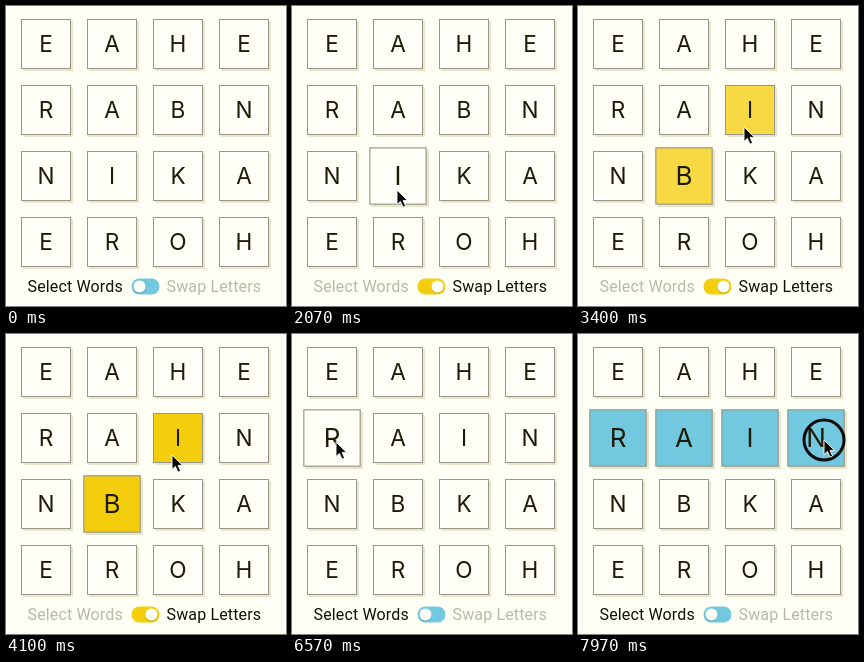
These frames come from a looping animation (280x300 px, 8000 ms). An HTML page:

```html
<!DOCTYPE html>
<html lang="en">
<head>
<meta charset="utf-8">
<title>Letter grid</title>
<style>
  html, body { margin: 0; width: 100%; height: 100%; overflow: hidden; background: #fffff6; }
  svg { display: block; width: 280px; height: 300px; cursor: default; }
  .letter { font: 400 22.6px Inter, "Open Sans", sans-serif; text-anchor: middle; fill: #1c1b08; }
  .label { font: 400 16px Roboto, Arial, sans-serif; letter-spacing: .15px; }
  .drag { filter: drop-shadow(0 0 7px rgba(165, 165, 40, .75)); }
</style>
</head>
<body>
<svg id="stage" viewBox="0 0 280 300" xmlns="http://www.w3.org/2000/svg"></svg>
<script>
const LOOP = 8000;
const INK = '#111108', MUTED = '#b8baa4';
const PAPER = [255, 255, 248], GOLD = [244, 206, 12], TEAL = [114, 200, 222];
const BEFORE = 'EAHERABNNIKAEROH', AFTER = 'EAHERAINNBKAEROH';
const FROM = 9, TO = 6;

// Moments of the story, in ms
const ON = 850, LIFT = 2312, DROP = 3300, CLEAR = 4280, OFF = 5285, PICK = 6720;
const PRESSES = [[740, ON], [2240, DROP], [5170, OFF], [PICK, LOOP]];

// Pointer stops: time, x, y, linear
const PATH = [
  [0, 168, 330], [150, 168, 330], [690, 136, 277], [1350, 136, 277],
  [2080, 105, 184], [LIFT, 105, 184], [LIFT + 700, 166, 121], [4180, 166, 121],
  [4950, 139, 281], [5560, 139, 281], [6350, 44, 108], [6760, 44, 108],
  [7500, 150, 106, 1], [7960, 246, 106, 1], [LOOP, 246, 106]
];

const stage = document.getElementById('stage');

function add(tag, attrs, parent = stage, text = '') {
  const el = document.createElementNS('http://www.w3.org/2000/svg', tag);
  set(el, attrs);
  el.textContent = text;
  parent.appendChild(el);
  return el;
}
function set(el, attrs) {
  for (const k in attrs) el.setAttribute(k, attrs[k]);
}

const clamp = v => Math.max(0, Math.min(1, v));
const smooth = u => u * u * (3 - 2 * u);
const mix = (a, b, u) => a + (b - a) * u;
const blend = (a, b, u) => `rgb(${a.map((v, i) => Math.round(mix(v, b[i], u)))})`;
const centre = i => [40 + 66 * (i % 4), 38 + 66 * Math.floor(i / 4)];
const show = (el, on) => set(el, { visibility: on ? 'visible' : 'hidden' });

function makeTile(parent = stage) {
  const g = add('g', {}, parent);
  add('rect', { x: -23, y: -23, width: 50, height: 50, fill: '#e6e6cc' }, g);
  const face = add('rect', { x: -24.5, y: -24.5, width: 49, height: 49, stroke: '#96968a', fill: blend(PAPER, PAPER, 0) }, g);
  const letter = add('text', { class: 'letter', y: 8 }, g);
  return { g, face, letter };
}

const tiles = [...BEFORE].map(() => makeTile());
const selectLabel = add('text', { class: 'label', x: 21.5, y: 286 }, stage, 'Select Words');
const swapLabel = add('text', { class: 'label', x: 160.5, y: 286 }, stage, 'Swap Letters');
const track = add('rect', { x: 125.5, y: 272.5, width: 28, height: 16, rx: 8 });
const knobShade = add('circle', { cy: 281.5, r: 6.3, fill: '#00230b', opacity: .14 });
const knob = add('circle', { cy: 280.5, r: 6, fill: '#fffffa' });

const dragged = makeTile(add('g', { class: 'drag', opacity: .86 }));
dragged.letter.textContent = BEFORE[FROM];

const ring = add('circle', { r: 20, fill: 'none', stroke: '#0a0a0a', 'stroke-width': 3 });
const arrow = add('path', {
  d: 'M0 0V14.5L3.4 11.4L6 17.2L8.6 16L6.1 10.4H10.6Z',
  fill: '#0a0a0a', stroke: '#fff', 'stroke-width': .9
});
const hand = add('g', {});
add('path', {
  d: 'M-1.7 1Q-1.5-.6 0-.6T1.7 1V6Q3-.0 4.7 6.4Q6.5 4.8 7.6 7Q10 6 10 9V12L8.6 15.5V17H-.5V15.2L-4.6 10.2Q-5.6 8 -3.8 7.8L-1.7 9.5Z',
  fill: '#fff', stroke: '#0a0a0a', 'stroke-width': 1.3, 'stroke-linejoin': 'round'
}, hand);
add('path', { d: 'M1.7 6V9M4.7 6.6V9M7.6 7.2V9M1.6 11.5V14.5M4 11.5V14.5M6.4 11.5V14.5', stroke: '#0a0a0a', fill: 'none' }, hand);

function pointer(t) {
  if (t <= 0) return [PATH[0][1], PATH[0][2]];
  const n = Math.max(1, PATH.findIndex(p => p[0] >= t));
  const a = PATH[n - 1], b = PATH[n];
  const u = clamp((t - a[0]) / (b[0] - a[0]));
  const e = b[3] ? u : smooth(u);
  return [mix(a[1], b[1], e), mix(a[2], b[2], e)];
}

function hovered(i, t) {
  // Hover stays on the lifted slot until the pointer moves again
  if (t > LIFT && t < 4200) return i === FROM;
  const [x, y] = pointer(t), [cx, cy] = centre(i);
  return Math.abs(x - cx) < 25 && Math.abs(y - cy) < 25;
}
function picked(i, t) {
  return t >= PICK && i >= 4 && i < 8 && pointer(t)[0] >= centre(i)[0] - 25;
}

// Share of the last 160 ms during which a state held
function fade(test, t) {
  let n = 0;
  for (let k = 0; k < 16; k++) n += test(t - k * 10) ? 1 : 0;
  return smooth(n / 16);
}

function draw(t) {
  const letters = t < DROP ? BEFORE : AFTER;
  const [px, py] = pointer(t);
  const lifted = t >= LIFT && t < DROP;

  tiles.forEach(({ g, face, letter }, i) => {
    const [cx, cy] = centre(i);
    const grow = fade(s => hovered(i, s) || picked(i, s), t);
    const teal = fade(s => picked(i, s), t);
    const gold = i === FROM || i === TO ? fade(s => s >= DROP && s < CLEAR, t) : 0;
    set(g, { transform: `translate(${cx} ${cy}) scale(${1 + .15 * grow})` });
    set(face, { fill: gold ? blend(PAPER, GOLD, gold) : blend(PAPER, TEAL, teal) });
    letter.textContent = letters[i];
    show(g, !(lifted && i === FROM));
  });

  set(dragged.g, { transform: `translate(${px} ${py - 15})` });
  show(dragged.g, lifted);

  const swapping = t >= ON && t < OFF;
  set(selectLabel, { fill: swapping ? MUTED : INK });
  set(swapLabel, { fill: swapping ? INK : MUTED });
  const on = smooth(clamp((t - ON) / 200)) - smooth(clamp((t - OFF) / 200));
  set(track, { fill: blend(TEAL, GOLD, on) });
  set(knob, { cx: 133.5 + 12 * on });
  set(knobShade, { cx: 133.5 + 12 * on });

  const place = `translate(${px} ${py})`;
  const overSwitch = px > 125 && px < 153 && py > 273 && py < 289;
  set(ring, { transform: place });
  set(arrow, { transform: place });
  set(hand, { transform: place + ' scale(.93)' });
  show(arrow, !overSwitch);
  show(hand, overSwitch);
  show(ring, PRESSES.some(([a, b]) => t >= a && t < b));
}

const start = performance.now();
function tick() {
  draw((performance.now() - start) % LOOP);
  requestAnimationFrame(tick);
}
tick();
</script>
</body>
</html>
```
